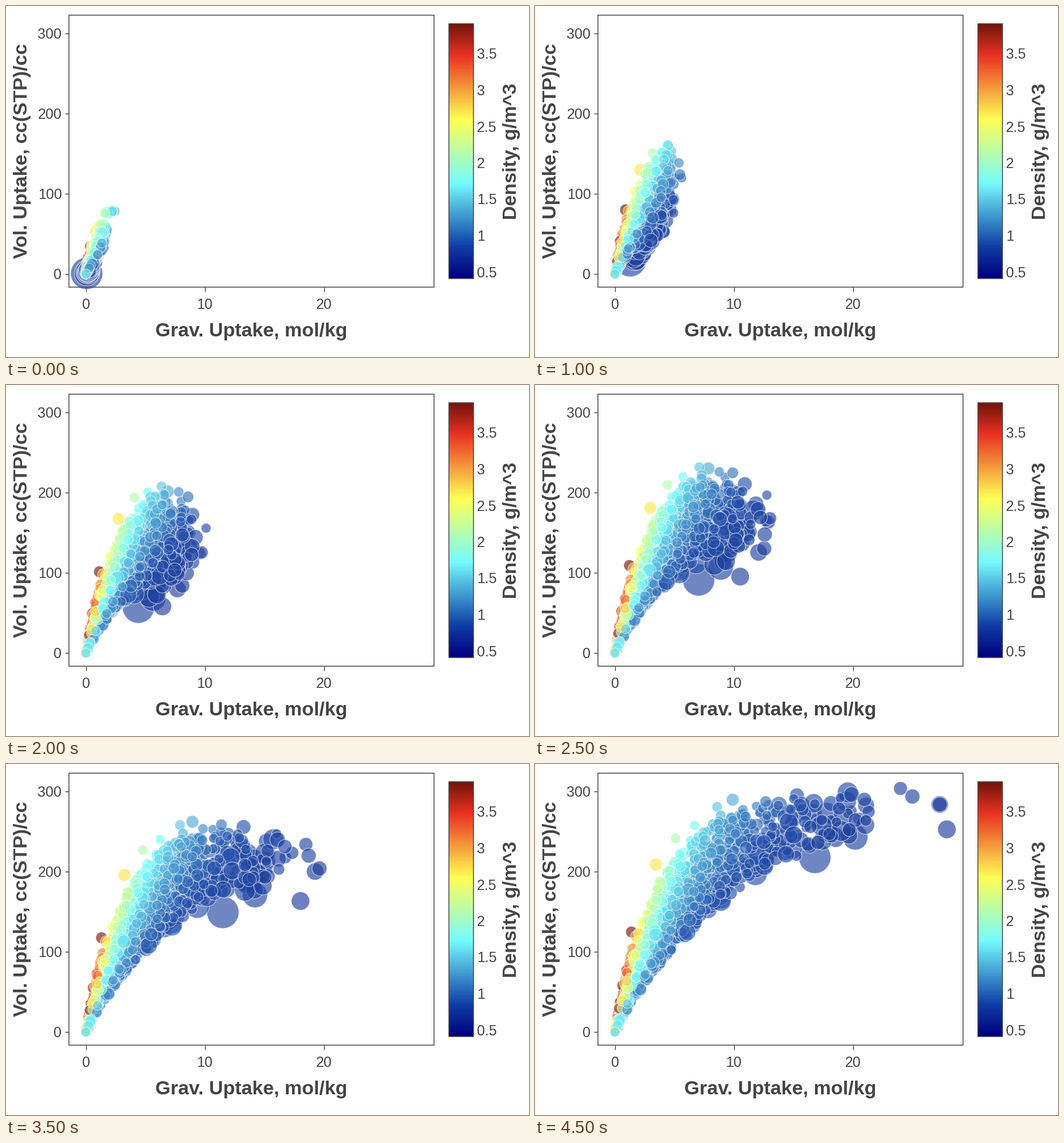
Animation, 914 px wide and 613 px high, one loop 5000 ms. Source, as a matplotlib script:

```python
import numpy as np
import matplotlib.pyplot as plt
from matplotlib.animation import FuncAnimation
from matplotlib.colors import LinearSegmentedColormap
from matplotlib.patches import Rectangle

W, H, DPI = 914, 613, 64
PT = 72 / DPI                     # points per pixel
INK = "#444444"
MOLAR = 22.4                      # cc(STP) per mmol
RHO_MIN, RHO_MAX = 0.41, 3.92
N = 1500

# relative pressure of each step
PRESSURE = np.array([0.15, 0.9, 2.8, 5.8, 11, 20, 33.5, 43, 65, 100]) / 100
P_MID = PRESSURE[4]

plt.rcParams["font.family"] = "Liberation Sans"
rng = np.random.default_rng(12)


def scale(dark, blue):
    return LinearSegmentedColormap.from_list("soft_jet", [
        (0, dark), (0.125, blue), (0.375, "#75fbfd"),
        (0.625, "#ffff54"), (0.875, "#eb3323"), (1, "#75140c")])


# final grav. uptake, final vol. uptake, radius of the lone circles
LONE = np.array([
    (16.8, 218, 28), (20.2, 243, 22), (11.8, 198, 21), (27.9, 253, 16),
    (27.3, 284, 15), (27.3, 284, 13), (24, 304, 12), (25, 294, 13),
    (9.9, 290, 11), (8.6, 281, 9), (6.7, 258, 8.5), (5.1, 242, 9),
    (3.45, 209, 11), (1.4, 125, 10)])
ORIGIN = (0.001, 0.035, 8.5)


def make_cloud(n):
    """Random materials: density sets the range of uptake and the size."""
    rho = rng.lognormal(np.log(1.4), 0.37, n)
    rho = np.minimum(0.54 + abs(rho - 0.54), 3.95)
    top = 300 / (1 + ((rho - 0.75) / 1.9) ** 2)
    low = 260 / (1 + np.exp(7 * (rho - 0.88)))
    vol = low + (top - low) * rng.beta(1.4, 1.6, n)
    spread = 0.6 + 9 * np.clip(1.05 - rho, 0, None)
    radius = np.minimum(8.3 + rng.exponential(1, n) * spread, 18)
    return np.column_stack([vol / (MOLAR * rho), vol, radius])


grav, vol, radius = np.vstack([LONE, make_cloud(N), ORIGIN]).T
rho = vol / (MOLAR * grav)

# dense materials fill early, light and wide ones late
share = 0.82 * (1 - np.exp(-1.41 * rho ** 1.33)) - 0.0075 * (radius - 9)
share[len(LONE):] += rng.normal(0, 0.04, N + 1)
share = np.clip(share, 0.22, 0.92)

# Sips isotherm through (P_MID, share) and (1, 1)
power = np.clip(1.29 - share, 0.3, 1)
mid = P_MID ** power
bend = mid * (1 - share) / (share - mid)


def px_x(g):
    return 139.5 + 20.8 * g


def px_y(v):
    return 468.3 - 1.4 * v


def offsets(step):
    p = PRESSURE[step] ** power
    load = p * (1 + bend) / (bend + p)
    return np.column_stack([px_x(grav * load), px_y(vol * load)])


fig = plt.figure(figsize=(W / DPI, H / DPI), dpi=DPI, facecolor="white")
ax = fig.add_axes([0, 0, 1, 1])


def label(x, y, s, size=25, **kw):
    ax.text(x, y, s, fontsize=size * PT, color=INK, va="baseline", **kw)


def title(x, y, s, angle=0):
    label(x, y, s, 34, weight="bold", ha="center", rotation=angle,
          rotation_mode="anchor")


def line(xs, ys):
    ax.plot(xs, ys, color=INK, lw=1.4 * PT, solid_capstyle="butt")


def box(x0, y0, x1, y1):
    ax.add_patch(Rectangle((x0, y0), x1 - x0, y1 - y0, fill=False,
                           ec=INK, lw=1.5 * PT, zorder=5))


ramp = np.linspace(1, 0, 445)[:, None]
ax.imshow(ramp, cmap=scale("#00007f", "#103ea6"), vmin=0, vmax=1,
          extent=(774, 816.5, 476, 31), aspect="auto")

box(110, 16, 748, 491)
box(774, 31, 816.5, 476)
for v in range(0, 301, 100):
    line([102.5, 110], [px_y(v)] * 2)
    label(97.5, px_y(v) + 9, str(v), ha="right")
for g in range(0, 21, 10):
    line([px_x(g)] * 2, [491, 498.5])
    label(px_x(g), 529, str(g), ha="center")
for d in np.arange(0.5, 3.6, 0.5):
    label(823, 473.5 - 127 * (d - 0.5), f"{d:g}", ha="left")

title(429, 577, "Grav. Uptake, mol/kg")
title(37, 253, "Vol. Uptake, cc(STP)/cc", 90)
title(892, 253.5, "Density, g/m^3", 90)

dots = ax.scatter(*offsets(0).T, s=(2 * radius * PT) ** 2, c=rho,
                  cmap=scale("#1c3a9a", "#2450ac"),
                  vmin=RHO_MIN, vmax=RHO_MAX, alpha=0.64,
                  edgecolors="white", linewidths=1.1 * PT, zorder=3)
ax.set(xlim=(0, W), ylim=(H, 0))
ax.axis("off")


def draw(step):
    dots.set_offsets(offsets(step))
    return dots,


def reset():
    return draw(0)


anim = FuncAnimation(fig, draw, frames=len(PRESSURE), init_func=reset,
                     interval=500, repeat=True, repeat_delay=0, blit=False)
plt.show()
```
